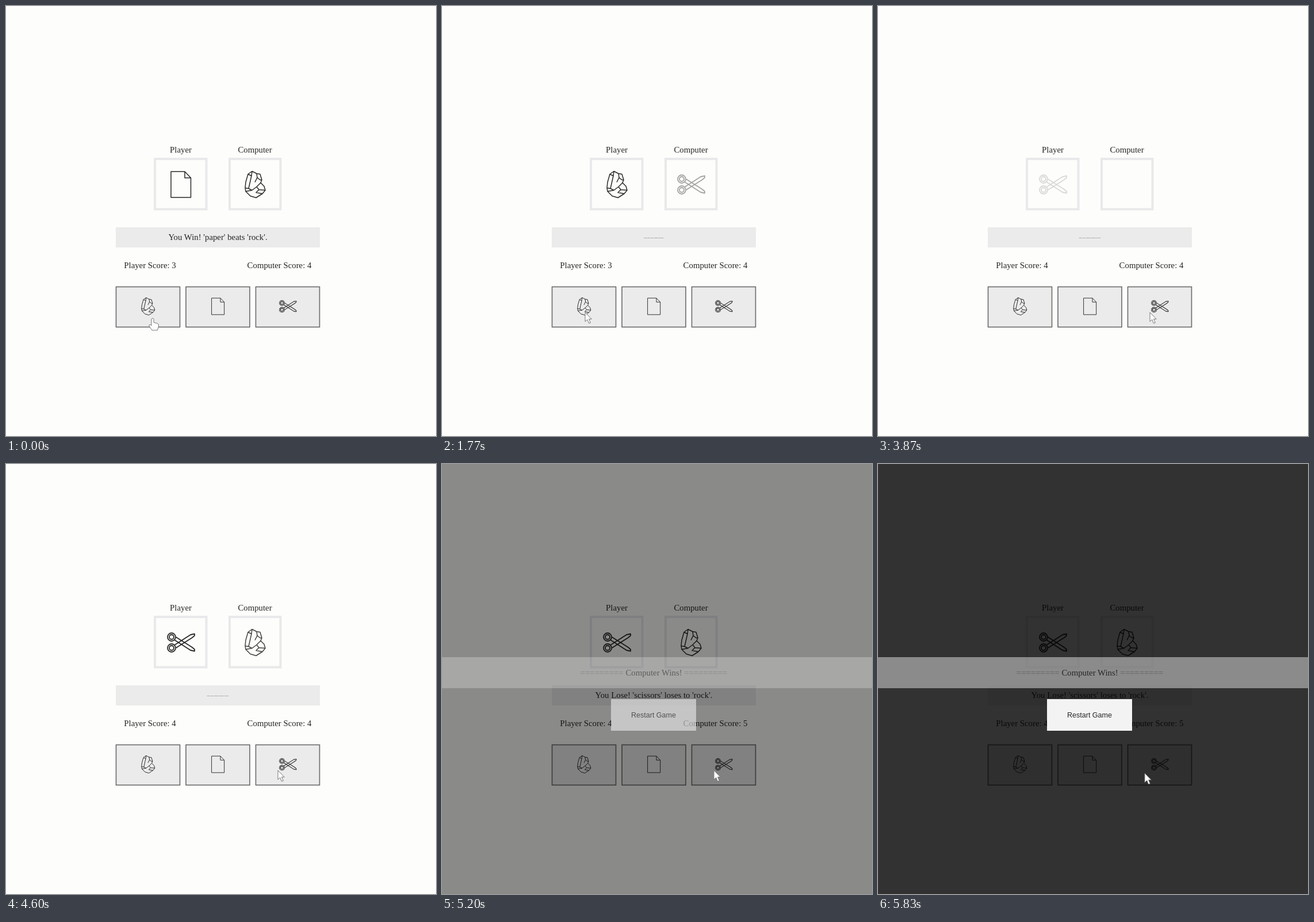
Animation, 748 px wide and 748 px high, one loop 5860 ms. Source, as an HTML page:

```html
<!DOCTYPE html>
<html lang="en">
<head>
<meta charset="utf-8">
<title>Rock, paper, scissors</title>
<style>
  html, body { margin: 0; height: 100%; overflow: hidden; background: #fdfdfb; }
  svg { display: block; width: 100vw; height: 100vh; }
  text { font: 14.8px "Liberation Serif", Times, serif; fill: #262626; text-anchor: middle; }
  .icon { fill: none; stroke: #2a2a2a; stroke-width: 1.5; stroke-linejoin: round; }
  .frame { fill: none; stroke: #e9e9eb; stroke-width: 4; }
  .button { fill: #ebebeb; stroke: #6a6a6a; stroke-width: 1.6; }
  .cursor { fill: #fff; stroke: #777; stroke-width: 1; stroke-linejoin: round; }
</style>
</head>
<body>
<svg viewBox="0 0 748 748">
  <defs>
    <path id="paper" d="M-17-22.5H7L17.5-11.5V22.5H-17ZM7-22.5V-11.5H17.5"/>
    <path id="rock" d="M-12-18L-5-23L3-19L9-18L12-8L10-3L16 3L18 10L13 16L2 23L-8 20L-16 12L-17 6L-16-4Z
      M-12-18L-6-15L-11 7L-17 6M-6-15L-5-23M3-19L4-12L9-8L12-8M4-12L0-4
      M-11 7L-5 10L3 4L10-3M3 4L7 9L18 10M7 9L2 14L13 16M-5 10L-16 12"/>
    <g id="half">
      <circle cx="-16" cy="9.5" r="7"/>
      <circle cx="-16" cy="9.5" r="4"/>
      <path d="M-11 4.5L17-13.5L24-15V-12L20-8.5L-8.5 9.5"/>
    </g>
    <g id="scissors" stroke-width="1.8"><use href="#half"/><use href="#half" transform="scale(1 -1)"/></g>
  </defs>

  <text x="304" y="255">Player</text>
  <text x="433" y="255">Computer</text>
  <rect class="frame" x="259" y="266" width="89.5" height="87.5"/>
  <rect class="frame" x="389" y="266" width="88.5" height="87.5"/>
  <use id="player" class="icon" transform="translate(304 310.5)"/>
  <use id="computer" class="icon" transform="translate(433 310.5)"/>

  <rect x="191" y="385" width="355" height="35" fill="#ebebeb"/>
  <text id="message" y="4"></text>
  <text id="playerScore" x="250.5" y="456"></text>
  <text id="computerScore" x="475.5" y="456"></text>

  <g id="buttons"></g>

  <rect id="shade" width="748" height="748"/>
  <rect id="band" y="336" width="748" height="54" fill="#fff"/>
  <g id="result">
    <text x="368.5" y="368"><tspan fill-opacity=".45">=========</tspan> Computer Wins! <tspan fill-opacity=".45">=========</tspan></text>
    <rect x="294" y="409" width="148" height="55" fill="#f3f3f3"/>
    <text x="368" y="441" style="font: 12.5px 'Liberation Sans', Arial, sans-serif">Restart Game</text>
  </g>

  <path id="arrow" class="cursor" d="M0 0V16L3.8 12.5L6.5 19L9.3 18L6.6 11.6H11.2Z"/>
  <path id="hand" class="cursor" d="M-2 1.5Q0-1.5 2 1.5V7.5L8 9Q11 10 10.5 14L8.5 21H-1L-6 13.5Q-6.5 10.5-3.8 11.5L-2 13Z"/>
</svg>
<script>
const LOOP = 5860, OVERLAY_AT = 5036, ROUND = 1200;
const el = id => document.getElementById(id);
const clamp = x => Math.max(0, Math.min(1, x));

const rounds = [
  { at: -2000, player: 'paper', computer: 'rock', text: "You Win! 'paper' beats 'rock'.", score: [3, 4] },
  { at: 1145, player: 'rock', computer: 'scissors', text: "You Win! 'rock' beats 'scissors'.", score: [4, 4] },
  { at: 3800, player: 'scissors', computer: 'rock', text: "You Lose! 'scissors' loses to 'rock'.", score: [4, 5] }
];

// Cursor stops: time, x, y
const stops = [
  [0, 255, 543], [250, 255, 543], [850, 249, 533], [2500, 249, 533],
  [3350, 473, 533], [5530, 473, 533], [5830, 464, 538]
];

const choices = [['rock', 191, 0.66], ['paper', 312.5, 0.64], ['scissors', 434, 0.62]];
el('buttons').innerHTML = choices.map(([name, x, size]) =>
  `<rect class="button" x="${x + 0.5}" y="488.5" width="111" height="70"/>
   <use class="icon" href="#${name}" transform="translate(${x + 56} 522.5) scale(${size})"/>`).join('');

// The CSS "ease" curve
function ease(x) {
  x = clamp(x);
  let lo = 0, hi = 1;
  const curve = (s, a, b) => 3 * a * s * (1 - s) ** 2 + 3 * b * s * s * (1 - s) + s ** 3;
  for (let i = 0; i < 24; i++) {
    const mid = (lo + hi) / 2;
    if (curve(mid, 0.25, 0.25) < x) lo = mid; else hi = mid;
  }
  return curve(lo, 0.1, 1);
}

function cursorAt(t) {
  const next = stops.findIndex(s => s[0] > t);
  if (next < 0) return stops[stops.length - 1].slice(1);
  const [t0, x0, y0] = stops[next - 1], [t1, x1, y1] = stops[next];
  const k = clamp((t - t0) / (t1 - t0)), p = k * k * (3 - 2 * k);
  return [x0 + (x1 - x0) * p, y0 + (y1 - y0) * p];
}

function draw(t) {
  const i = rounds.findLastIndex(r => r.at <= t);
  const round = rounds[i], age = t - round.at, done = age >= ROUND;

  el('player').setAttribute('href', '#' + round.player);
  el('computer').setAttribute('href', '#' + round.computer);
  el('player').style.opacity = ease(age / 500);
  el('computer').style.opacity = ease((age - 500) / 500);

  const scale = 0.19 + 0.81 * ease((age - 1000) / 200);
  el('message').textContent = round.text;
  el('message').setAttribute('transform', `translate(368.5 403) scale(${scale})`);

  const [mine, theirs] = (done ? round : rounds[i - 1]).score;
  el('playerScore').textContent = 'Player Score: ' + mine;
  el('computerScore').textContent = 'Computer Score: ' + theirs;

  const p = ease((t - OVERLAY_AT) / 500);
  el('shade').style.opacity = 0.8 * p;
  el('band').style.opacity = 0.43 * p;
  el('result').style.opacity = p;

  const [x, y] = cursorAt(t);
  const onButton = choices.some(c => x >= c[1] && x <= c[1] + 112);
  const active = done && t < OVERLAY_AT - 36 && onButton;
  for (const [id, shown] of [['hand', active], ['arrow', !active]]) {
    el(id).style.display = shown ? '' : 'none';
    el(id).setAttribute('transform', `translate(${x} ${y})`);
  }
}

const start = performance.now();
function tick() {
  draw((performance.now() - start) % LOOP);
  requestAnimationFrame(tick);
}
tick();
</script>
</body>
</html>
```
